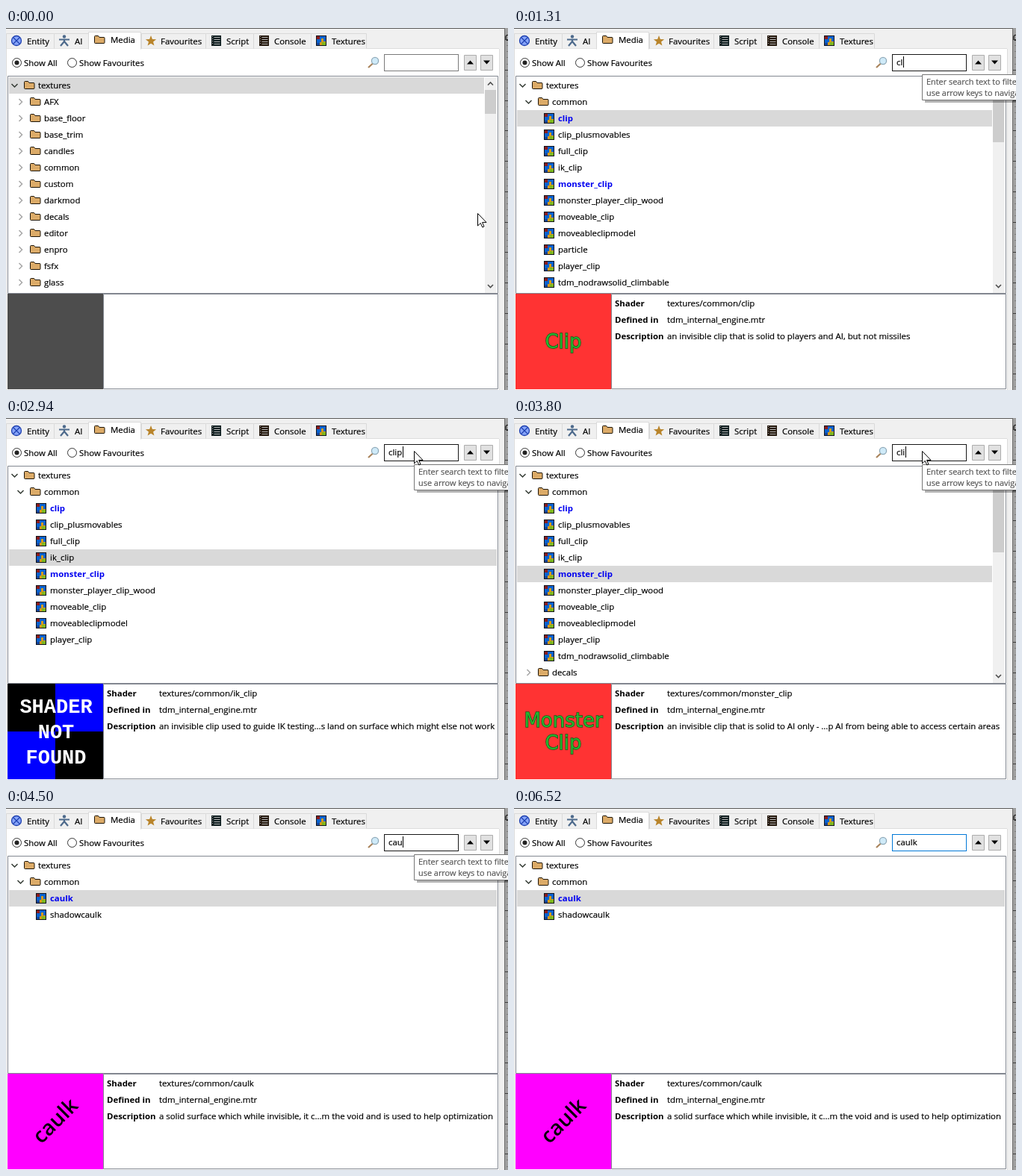
An HTML page that plays this animation: 672x485 px, repeating every 6600 ms.

```html
<!DOCTYPE html>
<html lang="en">
<head>
<meta charset="utf-8">
<title>Media browser search</title>
<style>
html, body { margin: 0; width: 100%; height: 100%; overflow: hidden; background: #f0f0f0; }
svg { display: block; }
text { font: 11.4px "Open Sans", "Noto Sans", sans-serif; white-space: pre; stroke: #000; stroke-width: .2; }
.bold { font-weight: 700; stroke: none; }
.fav { font-weight: 700; fill: #0000f0; stroke: none; }
.line { fill: none; stroke: #828790; }
.clip { font: 26px "DejaVu Sans", sans-serif; fill: #27b52f; stroke: #14561a; stroke-width: 1.4; paint-order: stroke; text-anchor: middle; }
.missing { font: bold 27px "Liberation Mono", monospace; fill: #fff; stroke: none; text-anchor: middle; }
.caulk { font: 600 28px "Open Sans", sans-serif; stroke: none; text-anchor: middle; }
.tip { font-size: 10.9px; fill: #575757; stroke: #575757; }
</style>
</head>
<body>
<svg width="672" height="485" viewBox="0 0 672 485">
  <defs>
    <path id="folder" d="M.5-4.5q0-1 1-1h4l1.5 2h6q1 0 1 1v6q0 1-1 1h-11.5q-1 0-1-1z" fill="#dcab68" stroke="#1c1408"/>
    <g id="texture">
      <path d="M0-7h14v14h-14z" fill="#10141c"/>
      <path d="M1-6h12v12h-12z" fill="#0a62d0"/>
      <path d="M1-6h4v4h-4z" fill="#8c1c1c"/>
      <path d="M7-3h3v4h3v5h-8v-4h2z" fill="#d59a1c"/>
      <path d="M8 2h5v4h-5z" fill="#7fb81e"/>
      <path d="M1 3h4v3h-4z" fill="#15459c"/>
    </g>
    <g id="script">
      <path d="M0-7h13v14h-13z"/>
      <path d="M3.5-4.5h8M3.5-1.5h8M3.5 1.5h8M3.5 4.5h8" stroke="#b4b4b4"/>
      <path d="M1.5-6v12" stroke="#bbb" stroke-dasharray="1 2"/>
    </g>
    <path id="open" d="M-4-2L0 2L4-2" fill="none" stroke="#333a33" stroke-width="1.5"/>
    <path id="closed" d="M-2-4L2 0L-2 4" fill="none" stroke="#a6a6a6" stroke-width="1.5"/>
  </defs>

  <path d="M0 0h672v485h-672z" fill="#f0f0f0"/>
  <path d="M0 28h660v457h-660z" fill="#fff"/>
  <path d="M0 .5h667" stroke="#5a5a5a"/>
  <path d="M.5 28V485M660.5 28V485M0 27.5h660" stroke="#dcdcdc"/>
  <g id="ruler"></g>
  <g id="tabs"></g>

  <g fill="none" stroke="#333">
    <circle cx="14.5" cy="46.5" r="6"/><circle cx="88.5" cy="46.5" r="6"/>
    <circle cx="14.5" cy="46.5" r="3" fill="#222" stroke="none"/>
  </g>
  <text x="24" y="51">Show All</text>
  <text x="98" y="51">Show Favourites</text>

  <path d="M491 47.5l-6 5.5" stroke="#a9845c" stroke-width="2.2"/>
  <circle cx="494" cy="44" r="4.6" fill="#cfeaf8" stroke="#8fa9b8" stroke-width="1.3"/>
  <rect id="field" x="506.5" y="35.5" width="99" height="22" fill="#fff"/>
  <text id="query" x="512" y="50"></text>
  <rect id="caret" y="38" width="1" height="15"/>
  <path d="M613.5 36.5h16v20h-16zM635.5 36.5h16v20h-16z" fill="#e1e1e1" stroke="#adadad"/>
  <path d="M617 48.5l4.5-5l4.5 5zM639 43.5h9l-4.5 5z"/>

  <path class="line" d="M2.5 64.5h656v291h-656z"/>
  <g id="tree"></g>
  <path class="line" d="M130.5 356.5h528v127h-528z"/>
  <g id="preview"></g>
  <g id="info"></g>

  <g id="tooltip">
    <path d="M550 66h125v34h-125z" opacity=".3"/>
    <path d="M546.5 62.5h140v34h-140z" fill="#fff" stroke="#767676"/>
    <text class="tip" x="552" y="76">Enter search text to filter the tree,</text>
    <text class="tip" x="552" y="91">use arrow keys to navigate.</text>
  </g>
  <path id="cursor" d="M.5.5V17L4.3 13.4L6.8 19L9 18L6.6 12.4H12z" fill="#fff" stroke="#000"/>
</svg>
<script>
const LOOP = 6600, STEP = 76.7;
const el = id => document.getElementById(id);
const use = (id, x, y, fill = '#111') => `<use href="#${id}" x="${x}" y="${y}" fill="${fill}"/>`;
const label = (text, x, y, cls = '') => `<text class="${cls}" x="${x}" y="${y}">${text}</text>`;
const box = (x, y, w, h, fill) => `<rect x="${x}" y="${y}" width="${w}" height="${h}" fill="${fill}"/>`;

// Tabs: left edge, right edge, text position, caption, icon
const star = Array.from({ length: 10 }, (_, i) => {
  const r = i % 2 ? 3.2 : 7.5, a = Math.PI * (i / 5 - .5);
  return `${194 + r * Math.cos(a)},${17.5 + r * Math.sin(a)}`;
}).join(' ');
const tabs = [
  [0, 64, 28, 'Entity', `<circle cx="14" cy="17" r="6.5" fill="#86a4f8" stroke="#1d3fb0" stroke-width="1.3"/>
    <path d="M9.5 12.5l9 9M18.5 12.5l-9 9" stroke="#1d3fb0" stroke-width="1.2"/>`],
  [64, 110, 92, 'AI', `<circle cx="78" cy="11.5" r="2.2" fill="#4d6a8c"/>
    <path d="M71 15.5h14M78 15v4M78 18l-5 6M78 18l5 6" fill="none" stroke="#4d6a8c" stroke-width="2.2"/>`],
  [181, 267, 207, 'Favourites', `<polygon points="${star}" fill="#b9852c"/>`],
  [267, 331, 295, 'Script', use('script', 275, 17, '#0c1c1e')],
  [331, 408, 359, 'Console', use('script', 339, 17, '#24180c')],
  [408, 482, 436, 'Textures', use('texture', 415, 17)],
  [110, 180, 140, 'Media', use('folder', 118, 16)]
];
el('tabs').innerHTML = tabs.map(([l, r, x, name, icon]) => {
  const on = name === 'Media', top = on ? 5.5 : 7.5, bottom = on ? 28.5 : 27.5;
  return `<path d="M${l + .5} ${bottom}V${top}H${r + .5}V${bottom}" fill="${on ? '#fff' : '#f0f0f0'}" stroke="#d9d9d9"/>`
    + icon + label(name, x, on ? 20 : 22);
}).join('');

let ruler = box(667, 0, 5, 485, '#a0a0a0') + box(667, 0, 1, 485, '#6e6e6e') + label('0', 668, 17);
for (let i = 0; i < 60; i++) {
  const major = i % 5 === 0;
  ruler += box(major ? 668 : 670, Math.round(15 + i * 8.15), 4, 1, major ? '#3c3c3c' : '#7c7c7c');
}
el('ruler').innerHTML = ruler;

// Row prefixes: "-" open folder, "+" closed folder, "!" favourite
const rows = s => ('-textures ' + s).split(' ');
const clips = '-common !clip clip_plusmovables full_clip ik_clip !monster_clip monster_player_clip_wood moveable_clip moveableclipmodel ';
const lists = {
  all: rows('+AFX +base_floor +base_trim +candles +common +custom +darkmod +decals +editor +enpro +fsfx +glass'),
  first: rows('-base_trim concrete_trim +candles +common +custom +darkmod +decals +editor +fsfx +glass +metal +stone'),
  cl: rows(clips + 'particle player_clip tdm_nodrawsolid_climbable'),
  cli: rows(clips + 'player_clip tdm_nodrawsolid_climbable +decals'),
  clip: rows(clips + 'player_clip'),
  c: rows('+base_trim +candles -common !caulk !clip clip_plusmovables !collision cushion full_clip ik_clip ladder_chain !monster_clip'),
  ca: rows('-candles candle_wax -common !caulk shadowcaulk +decals'),
  caulk: rows('-common !caulk shadowcaulk')
};
const thumbEnd = { all: 115, first: 115, cl: 153, cli: 180, c: 115 };

const fill = color => box(2, 356, 128, 128, color);
const clipArt = (color, ...lines) => fill(color)
  + lines.map((s, i) => label(s, 66, lines.length > 1 ? 414 + 30 * i : 429, 'clip')).join('');
const strip = color => fill('#4d4d4d') + box(50, 356, 32, 128, color);
const details = {
  textures: [fill('#4d4d4d')],
  concrete_trim: [strip('#8b8376'), '', 'base_trim'],
  candle_wax: [strip('#cdbd94'), '', 'candles'],
  clip: [clipArt('#ff3333', 'Clip'), 'an invisible clip that is solid to players and AI, but not missiles'],
  clip_plusmovables: [clipArt('#fb6a22', 'Clip Plus'), 'an invisible clip that blocks the player, ..., however allows movables to move within it'],
  full_clip: [clipArt('#ff3333', 'Full Clip'), 'an invisible clip that is solid to everything, including missiles'],
  ik_clip: [fill('#000') + box(66, 356, 64, 64, '#00f') + box(2, 420, 64, 64, '#00f')
    + ['SHADER', 'NOT', 'FOUND'].map((s, i) => label(s, 67, 395 + 34 * i, 'missing')).join(''),
    'an invisible clip used to guide IK testing...s land on surface which might else not work'],
  monster_clip: [clipArt('#ff3333', 'Monster', 'Clip'), 'an invisible clip that is solid to AI only - ...p AI from being able to access certain areas'],
  caulk: [fill('#f0f') + `<g transform="translate(67 420) rotate(-45)">${label('caulk', 0, 8, 'caulk')}</g>`,
    'a solid surface which while invisible, it c...m the void and is used to help optimization']
};

// Time, search text, list, selected row
const states = [
  [0, '', 'all', 'textures'],
  [1080, 'c', 'first', 'concrete_trim'],
  [1310, 'cl', 'cl', 'clip'],
  [1540, 'cli', 'cli', 'clip'],
  [1690, 'clip', 'clip', 'clip'],
  [2620, 'clip', 'clip', 'clip_plusmovables'],
  [2770, 'clip', 'clip', 'full_clip'],
  [2940, 'clip', 'clip', 'ik_clip'],
  [3090, 'clip', 'clip', 'monster_clip'],
  [3800, 'cli', 'cli', 'monster_clip'],
  [3950, 'cl', 'cl', 'monster_clip'],
  [4120, 'c', 'c', 'monster_clip'],
  [4350, 'ca', 'ca', 'candle_wax'],
  [4500, 'cau', 'caulk', 'caulk'],
  [4730, 'caul', 'caulk', 'caulk'],
  [4800, 'caulk', 'caulk', 'caulk']
];

function scrollbar(end) {
  return box(641, 66, 16, 289, '#f0f0f0') + box(641, 83, 15, end - 83, '#cdcdcd')
    + '<path d="M645 76.5l3.5-3.5l3.5 3.5M645 344l3.5 3.5l3.5-3.5" fill="none" stroke="#505050" stroke-width="1.6"/>';
}

function drawTree(list, selected) {
  const end = thumbEnd[list];
  return lists[list].map((row, i) => {
    const kind = '-+!'.includes(row[0]) ? row[0] : '';
    const name = row.slice(kind.length), isFolder = kind === '-' || kind === '+';
    const x = 8 * (i === 0 ? 0 : isFolder ? 1 : 2), y = 77 + 22 * i;
    return (name === selected ? box(4, y - 11, end ? 636 : 653, 22, '#d9d9d9') : '')
      + (isFolder ? use(kind === '-' ? 'open' : 'closed', x + 11.5, y) : '')
      + use(isFolder ? 'folder' : 'texture', x + 24, y)
      + label(name, x + 43, y + 4, kind === '!' ? 'fav' : '');
  }).join('') + (end ? scrollbar(end) : '');
}

function drawInfo(name) {
  const [, text, dir = 'common'] = details[name];
  if (text === undefined) return '';
  const file = dir === 'common' ? 'tdm_internal_engine.mtr' : `tdm_${dir}.mtr`;
  return [['Shader', `textures/${dir}/${name}`], ['Defined in', file], ['Description', text]]
    .map(([key, value], i) => label(key, 135, 373 + 22 * i, 'bold') + label(value, 205, 373 + 22 * i)).join('');
}

let shown;
function showState(state) {
  if (state === shown) return;
  shown = state;
  const [, query, list, selected] = state;
  el('query').textContent = query;
  const width = query ? el('query').getComputedTextLength() : -1;
  el('caret').setAttribute('x', Math.round(512.5 + width));
  el('tree').innerHTML = drawTree(list, selected);
  el('preview').innerHTML = details[selected][0];
  el('info').innerHTML = drawInfo(selected);
}

// Pointer path: time, x, y
const path = [
  [0, 631, 248], [150, 628, 215], [300, 610, 125], [450, 578, 38], [530, 560, 30], [600, 548, 41], [680, 546, 44],
  [5530, 546, 44], [5680, 552, 75], [5830, 570, 180], [5980, 592, 300], [6130, 612, 425], [6205, 620, 473]
];
function cursorAt(t) {
  const i = path.findIndex(p => p[0] > t);
  if (i < 0) return path[path.length - 1].slice(1);
  const [a, b] = [path[i - 1], path[i]], k = (t - a[0]) / (b[0] - a[0]);
  return [1, 2].map(n => Math.round(a[n] + k * (b[n] - a[n])));
}

const within = (t, ...spans) => spans.some(([a, b]) => t >= a && t < b);
const show = (id, on) => el(id).setAttribute('visibility', on ? 'visible' : 'hidden');

function tooltipOpacity(t) {
  if (t < 680 || t >= 5680) return 0;
  if (t >= 5600) return .5;
  return t < 760 ? .35 : t < 830 ? .7 : 1;
}

function frame(now) {
  const t = now % LOOP;
  showState(states.findLast(s => s[0] <= t));
  show('caret', within(t, [760, 2240], [2770, 3340], [3800, 5280], [5900, 6520]));
  show('cursor', within(t, [0, 1080], [1690, 4350], [5600, 6290]));
  const [x, y] = cursorAt(Math.floor((t + 12) / STEP) * STEP);
  el('cursor').setAttribute('transform', `translate(${x} ${y})`);
  el('tooltip').setAttribute('opacity', tooltipOpacity(t));
  el('field').setAttribute('stroke', t < 530 ? '#7a7a7a' : t < 5680 ? '#171717' : '#0078d7');
}

let start;
function tick(now) {
  start ??= now;
  frame(now - start);
  requestAnimationFrame(tick);
}
frame(0);
requestAnimationFrame(tick);
</script>
</body>
</html>
```
